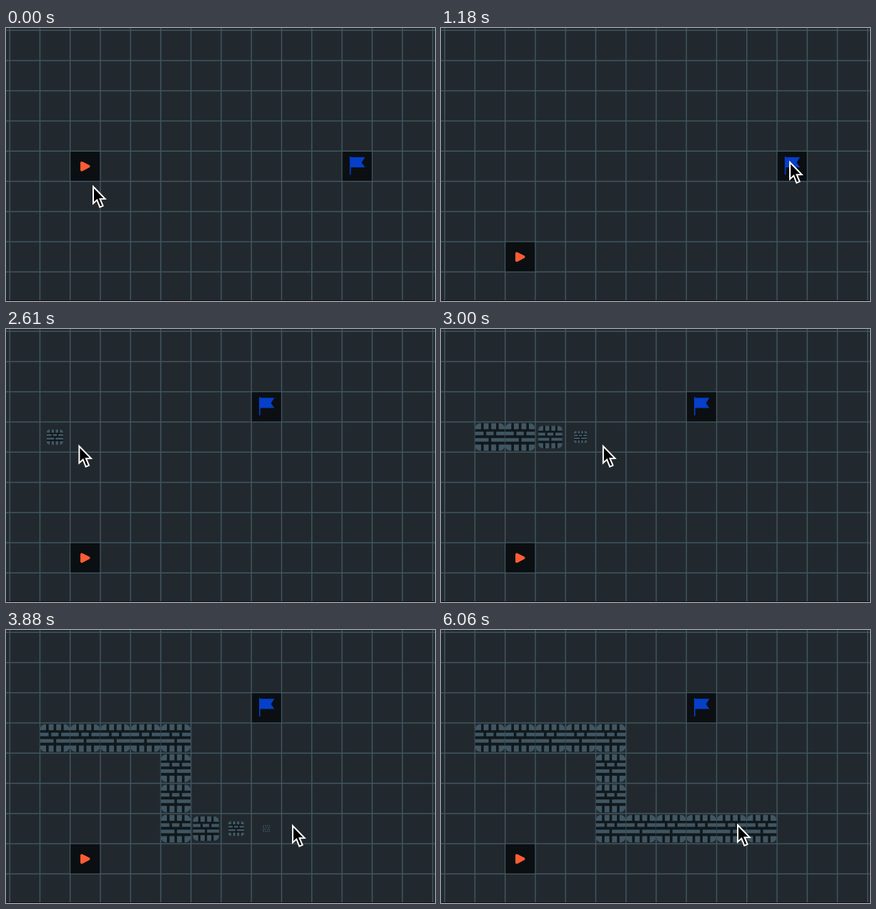
An HTML page with a canvas for the animation above (6.61 s loop, 600x382 px).

```html
<!DOCTYPE html>
<html lang="en">
<head>
<meta charset="utf-8">
<title>Grid editor</title>
<style>
html, body { margin: 0; width: 100%; height: 100%; overflow: hidden; background: #22292e; }
canvas { display: block; }
</style>
</head>
<body>
<canvas id="stage" width="600" height="382"></canvas>
<script>
const ctx = document.getElementById('stage').getContext('2d');
const LOOP = 6610, W = 600, H = 382;
const CELL = 42.25, LEFT = 5, TOP = 3;
const LAG = 45, GROW = 310;
const BG = '#22292e', LINE = '#425863', DARK = '#0b0f12';
const BRICK = '#405662', ORANGE = '#ff5c33', BLUE = '#063fc9';

// Pointer moves: start time, end time, then where it arrives
const home = [121, 220];
const moves = [
  [30, 280, 109, 194],
  [280, 560, 106, 306],
  [620, 1150, 487, 186],
  [1350, 1670, 357, 104],
  [1710, 2300, 74, 162],
  [2440, 3090, 234, 162],
  [3090, 3426, 234, 272],
  [3426, 4060, 440, 272],
  [4060, 4400, 414, 271]
];
const [, dragStart, , dragFlag, , drawWalls] = moves;

const clamp = (v, lo, hi) => Math.min(hi, Math.max(lo, v));
const ease = u => u * u * (3 - 2 * u);

function pointer(t) {
  let [x, y] = home;
  for (const [from, to, endX, endY] of moves) {
    const u = ease(clamp((t - from) / (to - from), 0, 1));
    x += (endX - x) * u;
    y += (endY - y) * u;
  }
  return [x, y];
}

function cellAt(t) {
  const [x, y] = pointer(t);
  return [Math.floor((x - LEFT) / CELL), Math.floor((y - TOP) / CELL)];
}

// The dragged item follows the pointer from cell to cell, a little late
const dragged = (t, [press, release]) => cellAt(clamp(t - LAG, press, release));

// Each wall starts growing when the pointer first enters its cell
const walls = new Map();
for (let t = drawWalls[0] - LAG; t < moves.at(-1)[1]; t += 5) {
  const cell = cellAt(t), key = cell.join();
  if (!walls.has(key)) walls.set(key, { cell, start: t + LAG });
}

function shape(points, fill) {
  ctx.beginPath();
  points.forEach(([x, y]) => ctx.lineTo(x, y));
  ctx.closePath();
  ctx.fillStyle = fill;
  ctx.fill();
}

function outline(color, width, join) {
  ctx.strokeStyle = color;
  ctx.lineWidth = width;
  ctx.lineJoin = join;
  ctx.stroke();
}

function at(x, y, paint) {
  ctx.save();
  ctx.translate(x, y);
  paint();
  ctx.restore();
}

const inCell = ([c, r], paint) => at(LEFT + c * CELL, TOP + r * CELL, paint);

function drawGrid() {
  ctx.fillStyle = BG;
  ctx.fillRect(0, 0, W, H);
  ctx.fillStyle = LINE;
  for (let x = LEFT; x < W; x += CELL) ctx.fillRect(x - 0.5, 0, 1.4, H);
  for (let y = TOP; y < H; y += CELL) ctx.fillRect(0, y - 0.4, W, 1.4);
  ctx.fillStyle = '#140d12';
  ctx.fillRect(0, H - 1, W, 1);
}

function darkCell() {
  ctx.fillStyle = DARK;
  ctx.fillRect(0.9, 1, 40.8, 40.8);
}

function drawArrow() {
  darkCell();
  shape([[16.5, 16.8], [26, 21.5], [16.5, 26.4]], ORANGE);
  outline(ORANGE, 4, 'round');
}

function drawFlag() {
  darkCell();
  at(-0.6, -0.7, () => {
    ctx.fillStyle = BLUE;
    ctx.fillRect(11.6, 8.5, 1.6, 25.5);
    shape([[12, 9.5], [33, 9.5], [28.2, 17], [33, 23.8], [12, 23.8]], BLUE);
  });
}

// One course of equal bricks with dark joints between them
function course(y, height, count) {
  const step = 42 / count, joint = 3.6;
  for (let i = 0; i < count; i++) {
    const x = i ? i * step + joint / 2 : 0;
    const end = i < count - 1 ? (i + 1) * step - joint / 2 : 42;
    ctx.fillRect(x, y, end - x, height);
  }
}

function drawWall(scale) {
  ctx.translate(CELL / 2, 21.4);
  ctx.scale(scale, scale);
  ctx.translate(-21, -19.5);
  ctx.beginPath();
  ctx.roundRect(0, 0, 42, 39, 8);
  ctx.clip();
  ctx.fillStyle = '#11181c';
  ctx.fillRect(0, 0, 42, 39);
  ctx.fillStyle = BRICK;
  course(0, 8.6, 4);
  course(12, 5, 3);
  course(21, 5, 2);
  course(30, 9, 4);
}

function drawPointer() {
  shape([[1, 2], [1, 25.4], [6.3, 20.6], [10.3, 30.6], [14.6, 28.8], [10.5, 19.2], [17.6, 19]], '#000');
  outline('#fff', 2, 'miter');
}

function draw(t) {
  drawGrid();
  for (const { cell, start } of walls.values()) {
    const scale = Math.min(1, (t - start) / GROW);
    if (scale > 0) inCell(cell, () => drawWall(scale));
  }
  inCell(dragged(t, dragStart), drawArrow);
  inCell(dragged(t, dragFlag), drawFlag);
  at(...pointer(t), drawPointer);
}

const begin = performance.now();
function tick() {
  draw((performance.now() - begin) % LOOP);
  requestAnimationFrame(tick);
}
tick();
</script>
</body>
</html>
```
